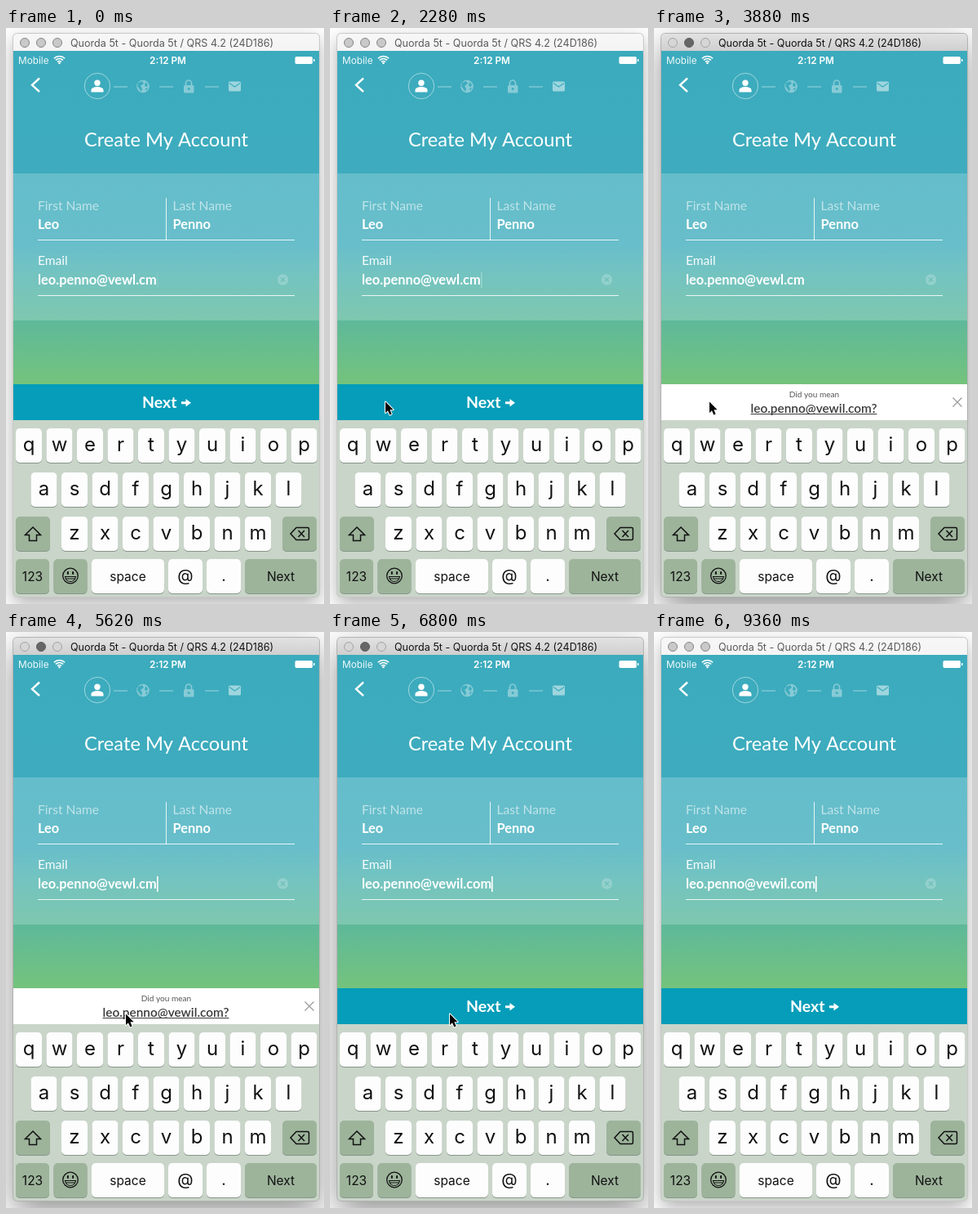
Animation, 390 px wide and 705 px high, one loop 9.39 s. Source, as an HTML page with a canvas:

```html
<!DOCTYPE html>
<html lang="en">
<head>
<meta charset="utf-8">
<title>Create My Account</title>
<style>
html, body { margin: 0; width: 100%; height: 100%; overflow: hidden; background: #fff; }
canvas { display: block; width: 390px; height: 705px; }
</style>
</head>
<body>
<canvas id="stage"></canvas>
<script>
const W = 390, H = 705, LOOP = 9390;
const LEFT = 9, WIDE = 375, BOTTOM = 696;
const WINDOW_ON = 3530, WINDOW_OFF = 8760;
const HINT_IN = 3600, HINT_OUT = 6180, FIXED_AT = 6150;
const BLINKS = [320, 800, 1280, 1800, 2250, 2760, 3210, 3690, 4180, 4660,
  5140, 5620, 6100, 6860, 7340, 7820, 8310, 8760, 9180];
const UI = 'Inter, Roboto, sans-serif';
const BRAND = 'Lato, "Open Sans", sans-serif';
const TYPO = 'leo.penno@vewl.cm', FIXED = 'leo.penno@vewil.com';

// Pointer legs: start, end, from, to, easing
const easeIn = p => p * p;
const easeOut = p => 1 - (1 - p) * (1 - p);
const linear = p => p;
const LEGS = [
  [580, 1060, [-8, 439], [42, 453], linear],
  [1060, 1500, [42, 453], [67, 457], easeOut],
  [1500, 4510, [67, 457], [67, 457], linear],
  [4510, 4850, [67, 457], [112, 471], easeIn],
  [4850, 5180, [112, 471], [146, 467], easeOut],
  [5180, 6800, [146, 467], [146, 467], linear],
  [6800, 7550, [146, 467], [-13, 463], easeIn],
  [8350, 8440, [357, 696], [354, 705], linear],
  [9190, 9230, [357, 699], [355, 705], linear]
];

const canvas = document.getElementById('stage');
const g = canvas.getContext('2d');
const ratio = window.devicePixelRatio || 1;
canvas.width = W * ratio;
canvas.height = H * ratio;

const clamp = v => Math.max(0, Math.min(1, v));
const ramp = (t, start, length) => clamp((t - start) / length);
const white = a => `rgba(255,255,255,${a})`;

function text(str, x, y, font, color, align = 'left') {
  g.font = font;
  g.fillStyle = color;
  g.textAlign = align;
  g.fillText(str, x, y);
}

function rect(x, y, w, h, color) {
  g.fillStyle = color;
  g.fillRect(x, y, w, h);
}

function round(x, y, w, h, r, color) {
  g.beginPath();
  g.roundRect(x, y, w, h, r);
  g.fillStyle = color;
  g.fill();
}

function disc(x, y, r, color) {
  g.beginPath();
  g.arc(x, y, r, 0, Math.PI * 2);
  g.fillStyle = color;
  g.fill();
}

function ring(x, y, r, color, width = 1) {
  g.beginPath();
  g.arc(x, y, r, 0, Math.PI * 2);
  g.strokeStyle = color;
  g.lineWidth = width;
  g.stroke();
}

function stroke(path, color, width) {
  g.strokeStyle = color;
  g.lineWidth = width;
  g.stroke(new Path2D(path));
}

function fill(path, color) {
  g.fillStyle = color;
  g.fill(new Path2D(path));
}

function vertical(y0, y1, stops) {
  const grad = g.createLinearGradient(0, y0, 0, y1);
  for (const [y, color] of stops) grad.addColorStop((y - y0) / (y1 - y0), color);
  return grad;
}

function drawWindow(active) {
  rect(0, 0, W, H, '#fff');
  g.save();
  g.shadowColor = active ? 'rgba(0,0,0,.44)' : 'rgba(0,0,0,.32)';
  g.shadowBlur = (active ? 40 : 22) * ratio;
  g.shadowOffsetY = (active ? 14 : 8) * ratio;
  round(LEFT, 7, WIDE, BOTTOM - 7, 5, '#c9d5c9');
  g.restore();
  g.beginPath();
  g.roundRect(LEFT - .5, 6.5, WIDE + 1, BOTTOM - 6, 5);
  g.strokeStyle = active ? '#b2b2b2' : '#c8c8c8';
  g.lineWidth = 1;
  g.stroke();

  const bar = active ? [[7, '#e2e2e2'], [28, '#cfcfcf']] : [[7, '#f7f7f7'], [28, '#f4f4f4']];
  round(LEFT, 7, WIDE, 21, [5, 5, 0, 0], vertical(7, 28, bar));
  const dots = active ? ['#d6d6d6', '#666', '#d6d6d6'] : ['#c9c9c9', '#c9c9c9', '#c9c9c9'];
  dots.forEach((color, i) => {
    disc(23 + 20 * i, 18, 5.5, color);
    ring(23 + 20 * i, 18, 5.5, active ? (i === 1 ? '#5c5c5c' : '#a4a4a4') : '#858585');
  });
  text('Quorda 5t - Quorda 5t / QRS 4.2 (24D186)', 203.5, 22.5, `12.6px ${UI}`,
    active ? '#111' : '#5a5a5a', 'center');
}

function drawStatus() {
  text('Mobile', 15, 43.5, `11.8px ${UI}`, white(.92));
  for (const r of [3.5, 6.5, 9.5]) {
    g.beginPath();
    g.arc(65.5, 44, r, -Math.PI * .75, -Math.PI * .25);
    g.strokeStyle = '#fff';
    g.lineWidth = 1.6;
    g.stroke();
  }
  disc(65.5, 43, 1.3, '#fff');
  text('2:12 PM', 198.5, 43.5, `600 11.8px ${UI}`, '#fff', 'center');
  round(354.5, 35, 21.5, 9, 1.8, '#fff');
  rect(377, 38, 1.5, 3, '#fff');
}

function drawSteps() {
  const dim = white(.38), back = '#3dacbe';
  stroke('M41 61.500 L32 69.800 L41 78', '#fff', 2.4);
  ring(112, 71, 15.7, white(.5));
  disc(112, 67.3, 3.7, '#fff');
  fill('M104.5 78.5 V76 C104.5 73 109 72 112 72 C115 72 119.5 73 119.5 76 V78.5 Z', '#fff');
  for (const x of [132, 188, 244]) rect(x, 71.5, 17, 1, white(.5));

  disc(168, 71.5, 7.8, dim);
  fill('M162 67 L167 65 L169 68 L165 71 L167 74 L166 78 L163 74 L161 71 Z', back);
  fill('M171 66 L174 69 L173 72 L170 71 Z M171 74 L174 73 L172 77 Z', back);

  stroke('M220.5 70 V67.5 A3.5 3.5 0 0 1 227.5 67.5 V70', dim, 1.7);
  round(218, 70, 12.5, 9.5, 1.5, dim);
  disc(224.2, 74.5, 1.5, back);

  round(273, 65.5, 15, 12, 1.5, white(.5));
  stroke('M274 67.5 L280.5 72 L287 67.5', back, 1.3);
}

function drawForm(t) {
  rect(LEFT, 28, WIDE, 408, vertical(28, 436, [
    [28, '#3babbd'], [178, '#3eacbe'], [265, '#42aebd'],
    [300, '#50b4b1'], [358, '#5eb99a'], [436, '#74c37c']
  ]));
  rect(LEFT, 178, WIDE, 180, white(.2));
  drawStatus();
  drawSteps();
  text('Create My Account', 196.5, 145, `23.7px ${BRAND}`, '#fff', 'center');

  const label = `15.6px ${BRAND}`, value = `bold 16.4px ${BRAND}`;
  text('First Name', 39, 222.5, label, white(.58));
  text('Last Name', 204.5, 222.5, label, white(.58));
  text('Leo', 39, 246, value, '#fff');
  text('Penno', 204.5, 246, value, '#fff');
  rect(196, 208, 1, 52, white(.85));
  rect(39, 259, 315, 1, white(.85));
  rect(39, 327, 315, 1, white(.85));
  text('Email', 39, 290, label, white(.95));

  const email = t < FIXED_AT ? TYPO : FIXED;
  text(email, 39, 313.5, value, '#fff');
  const caretX = Math.round(39 + g.measureText(email).width);
  rect(caretX, 299, 1.6, 19, white(caretAlpha(t)));

  disc(339.5, 308, 6.7, white(.22));
  stroke('M337 305.5 L342 310.5 M342 305.5 L337 310.5', '#70bfba', 1.4);
}

function caretAlpha(t) {
  const passed = BLINKS.filter(at => at <= t);
  if (!passed.length) return .1 * (1 - ramp(t, 0, 30));
  const p = ramp(t, passed.at(-1), 120);
  return passed.length % 2 ? p : 1 - p;
}

function drawAction(t) {
  rect(LEFT, 436, WIDE, 44, '#059db9');
  text('Next', 167, 465, `bold 19.5px ${BRAND}`, '#fff');
  fill('M215 457.3 H220.5 V454 L227 458.7 L220.5 463.5 V460.2 H215 Z', '#fff');

  const shown = ramp(t, HINT_IN, 260) * (1 - ramp(t, HINT_OUT, 300));
  if (!shown) return;
  g.save();
  g.globalAlpha = shown;
  rect(LEFT, 436, WIDE, 44, '#fff');
  text('Did you mean', 196.5, 451.5, `10.1px ${BRAND}`, '#555', 'center');
  const hint = FIXED + '?';
  text(hint, 196, 470.5, `600 15.4px ${BRAND}`, '#3a3a3a', 'center');
  const width = g.measureText(hint).width;
  rect(196 - width / 2, 472, width, 1, '#3a3a3a');
  stroke('M366.5 452.5 L377.5 463.5 M377.5 452.5 L366.5 463.5', '#999', 1.2);
  g.restore();
}

function key(x, y, w, label = '', size = 24, color = '#fdfdfd') {
  round(x, y + 1, w, 42, 5, '#87968a');
  round(x, y, w, 42, 5, color);
  const drop = size > 20 ? 28 : 27;
  text(label, x + w / 2, y + drop, `${size}px ${UI}`, '#111', 'center');
}

function drawKeyboard() {
  const dark = '#9db49b';
  round(LEFT, 480, WIDE, BOTTOM - 480, [0, 0, 5, 5], '#c9d5c9');
  [['qwertyuiop', 12, 490], ['asdfghjkl', 30.5, 544], ['zxcvbnm', 68, 598]]
    .forEach(([letters, x, y]) =>
      [...letters].forEach((letter, i) => key(x + 37.5 * i, y, 32, letter)));

  key(12, 598, 42, '', 16, dark);
  stroke('M33 611 L42.5 620.5 H37.5 V627.5 H28.5 V620.5 H23.5 Z', '#111', 1.5);
  key(339, 598, 42, '', 16, dark);
  stroke('M349 619 L356 611.5 H370 Q371.5 611.5 371.5 613 V625 ' +
    'Q371.5 626.5 370 626.5 H356 Z M358.5 615 L366 623 M366 615 L358.5 623', '#111', 1.5);

  key(12, 650, 41, '123', 15.5, dark);
  key(58.5, 650, 41, '', 16, dark);
  ring(79, 670.5, 9.3, '#111', 1.3);
  round(74.9, 665, 2, 4, 1, '#111');
  round(81.1, 665, 2, 4, 1, '#111');
  stroke('M72.5 671.5 H85.5 Q84.5 677.5 79 677.5 Q73.5 677.5 72.5 671.5 Z M73.5 674 H84.5', '#111', 1.1);
  key(105, 650, 89, 'space', 15.5);
  key(199, 650, 42, '@', 20);
  key(246, 650, 42, '.', 19);
  key(293, 650, 88, 'Next', 15.5, dark);
}

function drawPointer(t) {
  const leg = LEGS.find(([start, end]) => t >= start && t < end);
  if (!leg) return;
  const [start, end, from, to, ease] = leg;
  const p = ease((t - start) / (end - start));
  g.save();
  g.translate(from[0] + (to[0] - from[0]) * p + 1, from[1] + (to[1] - from[1]) * p + .5);
  const arrow = 'M0 0 V13.5 L3 10.7 L5.3 16 L7.6 15 L5.4 9.8 H9.6 Z';
  g.lineJoin = 'round';
  stroke(arrow, '#fff', 2);
  fill(arrow, '#000');
  g.restore();
}

function draw(t) {
  g.setTransform(ratio, 0, 0, ratio, 0, 0);
  g.textBaseline = 'alphabetic';
  drawWindow(t >= WINDOW_ON && t < WINDOW_OFF);
  drawForm(t);
  drawAction(t);
  drawKeyboard();
  drawPointer(t);
}

const began = performance.now();
function tick() {
  draw((performance.now() - began) % LOOP);
  requestAnimationFrame(tick);
}
tick();
</script>
</body>
</html>
```
